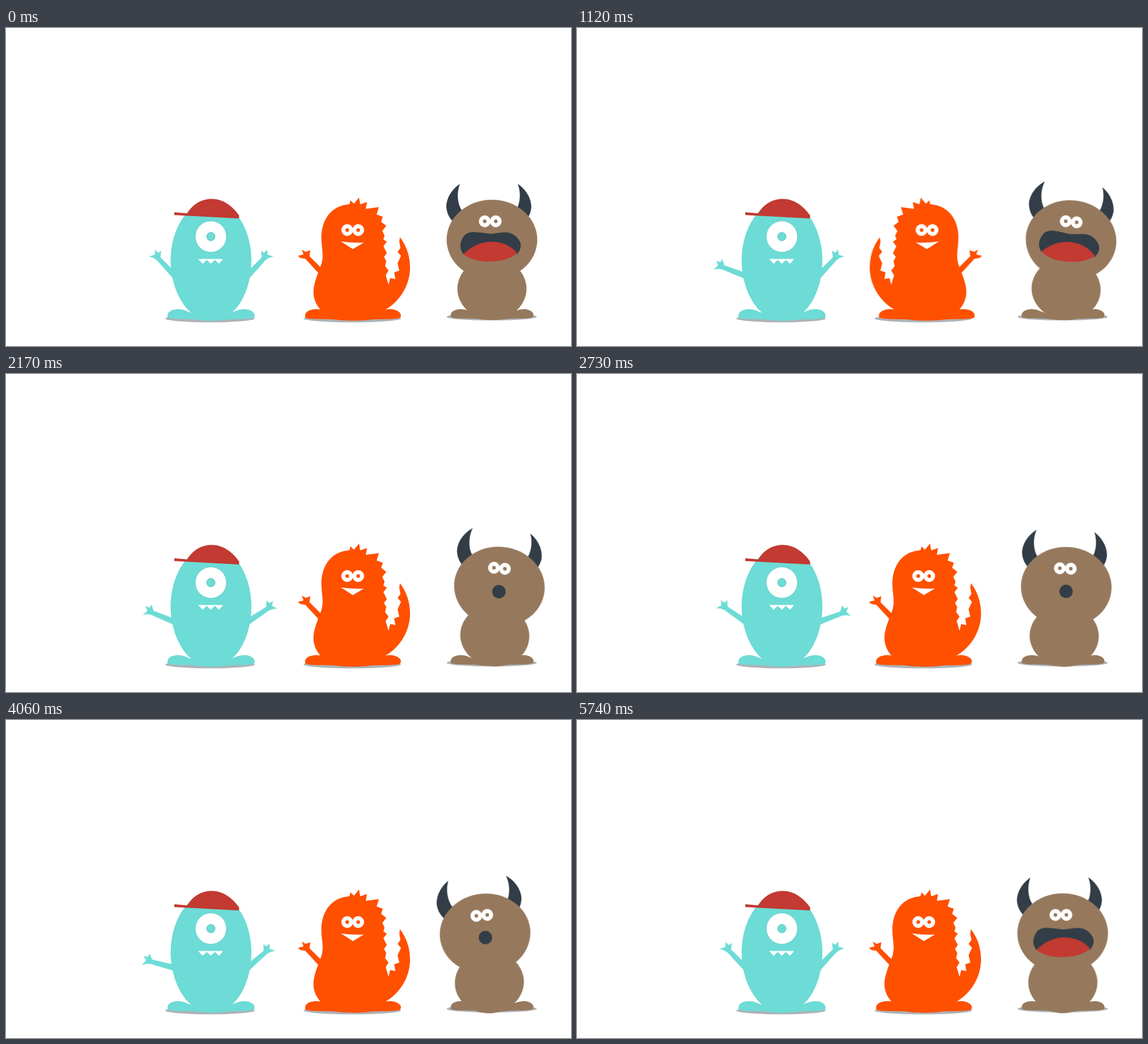
Write an HTML page that moves like this. It is 997x561 px and loops after 5810 ms.

```html
<!DOCTYPE html>
<html lang="en">
<head>
<meta charset="utf-8">
<title>Three monsters</title>
<style>
html, body { margin: 0; width: 100%; height: 100%; overflow: hidden; background: #fff; }
svg { display: block; width: 997px; height: 561px; }

.teal { fill: #6ddbd6; }
.orange { fill: #ff5000; }
.brown { fill: #96795d; }
.dark { fill: #323d47; }
.red { fill: #c23a32; }
.white { fill: #fff; }
.shadow { fill: #aeb2b5; }

.arm, .sway, .sink, .flip, .shout, .shift, .gasp {
  animation: 5810ms linear infinite;
}
.arm { transform-origin: 297px 439px; }
.wave { animation-name: wave; }
.late { animation-name: late; }
.sway { transform-origin: 857px 515px; animation-name: sway; }
.sink { animation-name: sink; }
.flip { transform-origin: 614.75px 0; animation-name: flip; animation-timing-function: step-end; }
.shout { animation-name: shout; animation-timing-function: step-end; }
.gasp { animation-name: gasp; animation-timing-function: step-end; }
.shift { animation-name: shift; }

/* Beats fall on the 70 ms grid: 1610, 3220, 4200 and 5180 ms */
@keyframes wave {
  0% { transform: rotate(0deg); animation-timing-function: steps(23); }
  27.711% { transform: rotate(-37deg); animation-timing-function: steps(23); }
  55.422% { transform: rotate(-1deg); animation-timing-function: steps(14); }
  72.289% { transform: rotate(-37deg); animation-timing-function: steps(14); }
  89.157%, 100% { transform: rotate(-1deg); }
}
@keyframes late {
  0% { transform: rotate(0deg); }
  27.711% { transform: rotate(0deg); animation-timing-function: steps(23); }
  55.422% { transform: rotate(-38deg); animation-timing-function: steps(14); }
  72.289%, 100% { transform: rotate(0deg); }
}
@keyframes sway {
  0% { transform: rotate(0deg); animation-timing-function: steps(23); }
  27.711% { transform: rotate(8.35deg); animation-timing-function: steps(23); }
  55.422% { transform: rotate(-.2deg); animation-timing-function: steps(14); }
  72.289% { transform: rotate(-5.8deg); animation-timing-function: steps(14); }
  89.157%, 100% { transform: rotate(-.2deg); }
}
@keyframes sink {
  0% { transform: translateY(0); }
  27.711% { transform: translateY(.3px); animation-timing-function: steps(23); }
  55.422%, 100% { transform: translateY(2.8px); }
}
@keyframes flip {
  0%, 34.94%, 69.28%, 100% { transform: scaleX(1); }
  16.87%, 51.81% { transform: scaleX(-1); }
}
@keyframes shout {
  0%, 72.289%, 100% { visibility: visible; }
  27.711% { visibility: hidden; }
}
@keyframes gasp {
  0%, 72.289%, 100% { visibility: hidden; }
  27.711% { visibility: visible; }
}
@keyframes shift {
  0% { transform: translate(0, 0); animation-timing-function: step-end; }
  72.289% { transform: translate(5.7px, 10.9px); animation-timing-function: steps(23); }
  100% { transform: translate(3.7px, 6.3px); }
}
</style>
</head>
<body>
<svg viewBox="0 0 997 561">
  <defs>
    <path id="feet" d="M-76 16C-79 6-69 1-58 1C-46 1-42 6-32 8H34C42 5 50 .5 60 1C70 1 81 8 76 16C66 20 40 18 28 19.5C14 22-14 22-26 19.5C-40 18-66 20-76 16Z"/>
    <path id="limb" d="M252 403L262.5 400L263 391L268.5 396.5L274 393L272.5 404.5L301 433L294 441L266 409.5L260 405.5Z"/>
    <path id="horn" d="M801 275C787 284 777 300 777 316C778 327 782 334 788 341L805 323C796 310 795 290 801 275Z"/>
    <g id="eyes">
      <circle class="white" cx="-9.7" r="10.4"/>
      <circle class="white" cx="9.7" r="10.4"/>
      <circle cx="-9.7" r="3.2"/>
      <circle cx="9.7" r="3.2"/>
    </g>
  </defs>

  <g class="teal">
    <ellipse class="shadow" cx="360" cy="512.5" rx="79" ry="6.8"/>
    <use href="#limb" class="arm wave"/>
    <g transform="matrix(-1 0 0 1 724 0)"><use href="#limb" class="arm late"/></g>
    <path d="M362 305C321 305 290.5 355 290.5 410C290.5 452 308 489 330 505H395C417 489 433 452 433 410C433 355 403 305 362 305Z"/>
    <use href="#feet" transform="translate(361.5 495)"/>
    <path class="red" d="M297 325L320 327C329 311 345 301.5 363 301.5C383 301.5 400 314 411.5 331L411 336L297 330Z"/>
    <circle class="white" cx="361.5" cy="368" r="27.5" stroke="#5fc9c4" stroke-width=".8"/>
    <circle cx="361.5" cy="368" r="7.4" stroke="#48b5b0" stroke-width=".8"/>
    <path class="white" d="M339 407.5H383L376 416L368.5 409L361.5 416L354 409L347 416Z"/>
  </g>

  <ellipse class="shadow" cx="611" cy="512.5" rx="86" ry="6.8"/>
  <g class="orange flip">
    <path d="M515 402L525 399.5L522 391L529 395L537 392L535.5 402.5L556 423L551 432L528 407L520 406Z"/>
    <path d="M556.5 372C556 338 574 313 606 311L608 304L614 310L623 299L625 311L637 307L635 319L658 316L654 329L665 333L662 342L671 349L664 358L668 366L666 373L672 377L666 385L672 397L667 404L671 411L669 420L675 428L670 436L675 453L678 441L687 443L685 431L694 428L691 415L697 402L691 395L696 388L694 377L695 369C707 384 713 403 713 424C712 458 692 486 664 500H558C545 488 541 472 543 459C545 444 552 430 557 415C561 400 557 390 556.5 372Z"/>
    <use href="#feet" transform="translate(612 495) scale(1.1 1)"/>
    <path d="M556 496H668L650 510H570Z"/>
    <use href="#eyes" transform="translate(611.8 356.5)"/>
    <path class="white" d="M591 376.5Q611 379.5 631.5 378.5L612 390Z"/>
  </g>

  <g class="brown">
    <ellipse class="shadow" cx="857" cy="509.5" rx="79.5" ry="6.5"/>
    <use href="#feet" transform="translate(857.5 495) scale(.95 .94)"/>
    <g class="sway">
      <g class="sink">
        <g class="dark">
          <use href="#horn"/>
          <use href="#horn" transform="matrix(-1 0 0 1 1704 0)"/>
        </g>
        <ellipse cx="857.5" cy="460" rx="61" ry="54.5"/>
        <ellipse cx="857.5" cy="373.5" rx="80" ry="70.5"/>
        <use href="#eyes" transform="translate(854.5 341)"/>
      </g>
      <g class="shout">
        <g class="shift">
          <path class="dark" d="M807 399C800 390 800 378 808 367C818 355 838 362 855 363C872 362 886 356 899 367C910 377 912 387 902 399Z"/>
          <path class="red" d="M807 399C818 388 835 377 857 377C880 377 896 389 902 397C890 408 870 412 850 412C832 412 818 407 807 399Z"/>
        </g>
      </g>
      <circle class="dark gasp" cx="857.5" cy="383.4" r="11.8"/>
    </g>
  </g>
</svg>
</body>
</html>
```
